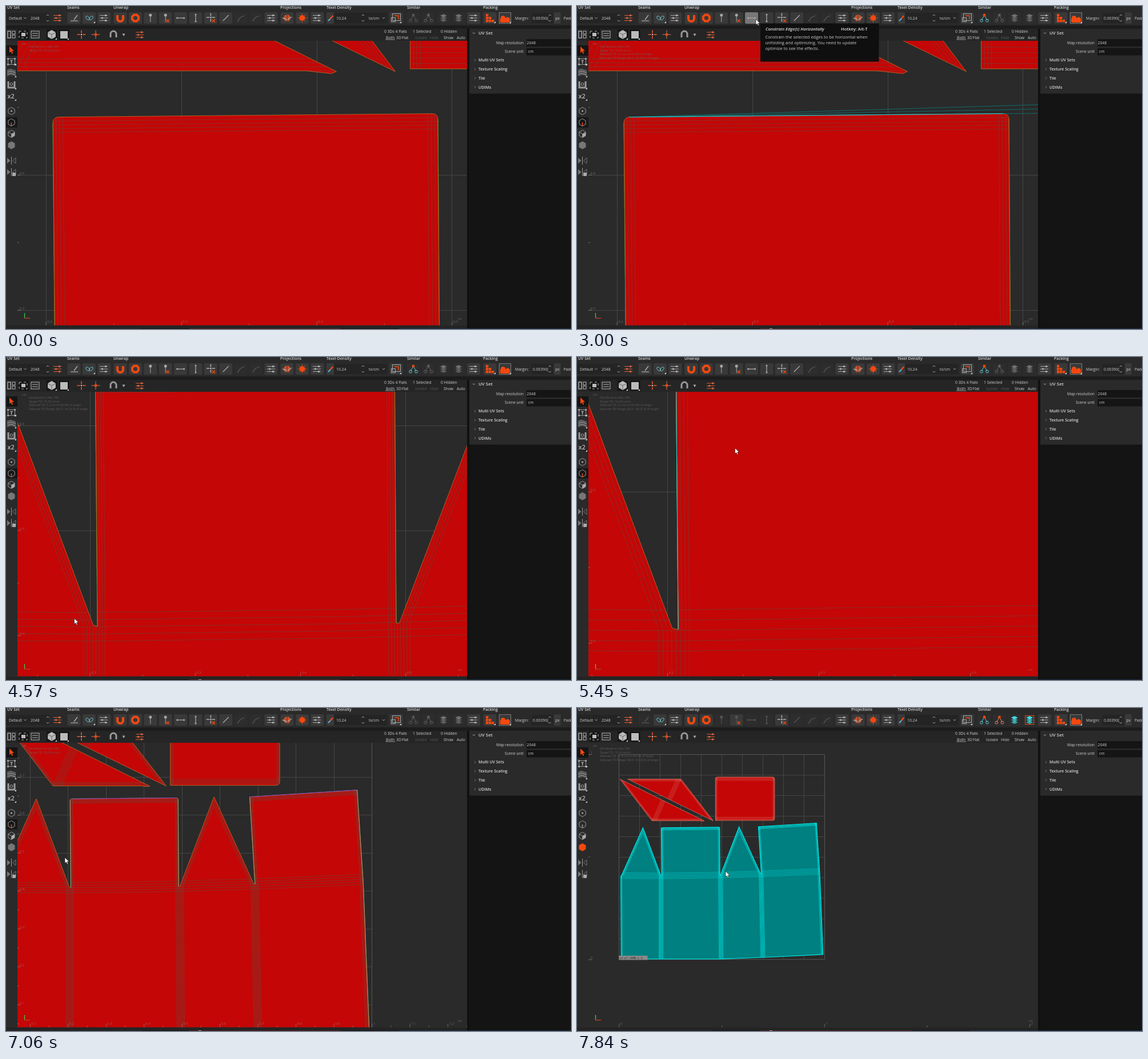
An HTML page with a canvas for the animation above (8 s loop, 989 px wide and 566 px high).

```html
<!DOCTYPE html>
<html lang="en">
<head>
<meta charset="utf-8">
<title>UV editor</title>
<style>
html, body { margin: 0; width: 100%; height: 100%; overflow: hidden; background: #141414; }
canvas { display: block; }
</style>
</head>
<body>
<canvas id="stage" width="989" height="566"></canvas>
<script>
const ctx = document.getElementById('stage').getContext('2d');
const LOOP = 8000;
const ORANGE = '#f4480f', GREY = '#a8a8a8', DIM = '#565656', CYAN = '#22d8e0', RED = '#c40606';
const FONT = '"Open Sans", "Noto Sans", sans-serif';
const VIEW = { x: 20, y: 61, r: 807, b: 559.5 };

// wheel zooms about a fixed screen point
const ZOOMS = [
  { from: 4130, to: 4550, by: .7774, x: 416, y: -495 },
  { from: 4590, to: 4870, by: 1.439, x: 121, y: 458 },
  { from: 6860, to: 7060, by: .2511, x: 92, y: 260 },
  { from: 7060, to: 7640, by: .5402, x: 189, y: 269.5 }
];
const MOVES = [
  { from: 20, to: 820, x: 755.5, y: 193, bow: 270 },
  { from: 1080, to: 1680, x: 200, y: 191 },
  { from: 1960, to: 2480, x: 313, y: 23 },
  { from: 3260, to: 3880, x: 119.5, y: 458 },
  { from: 5070, to: 5270, x: 176, y: 420 },
  { from: 5270, to: 5570, x: 330, y: 21 },
  { from: 6640, to: 6660, x: 315.5, y: 41 },
  { from: 6660, to: 6860, x: 100, y: 262 },
  { from: 6860, to: 7060, x: 103, y: 262 },
  { from: 7060, to: 7640, x: 260, y: 286 }
];

const clamp = k => Math.max(0, Math.min(1, k));
const phase = (t, m) => clamp((t - m.from) / (m.to - m.from));
const range = (n, f) => Array.from({ length: n }, (_, i) => f(i));

let cam;
function cameraAt(t) {
  const c = { s: 2369, x: -403.6, y: 1717.5 };
  for (const z of ZOOMS) {
    const f = Math.pow(z.by, phase(t, z));
    c.s *= f;
    c.x = z.x + (c.x - z.x) * f;
    c.y = z.y + (c.y - z.y) * f;
  }
  return c;
}
function pointerAt(t) {
  let x = -14, y = 180;
  for (const m of MOVES) {
    const k = phase(t, m), e = k * k * (3 - 2 * k);
    x += (m.x - x) * e;
    y += (m.y - y) * e + (m.bow || 0) * Math.sin(Math.PI * e);
  }
  return [x, y];
}
const sx = u => cam.x + u * cam.s / 1000;
const sy = v => cam.y - v * cam.s / 1000;
const uv = pts => pts.map(([u, v, r = 0]) => [sx(u), sy(v), r * cam.s / 1000]);

// islands in thousandths of UV space, an optional third value rounds the corner
const FLAPS = [
  [[207, 409], [205, 642.8, 4], [489.5, 645.4, 4], [491, 412]],
  [[692, 418], [678, 648], [961, 666], [977, 420]]
];
const SPIKES = [
  [[12, 411], [116, 643], [203, 410]],
  [[494, 412], [584, 648], [689, 418]]
];
const BODY = [...SPIKES[0], ...FLAPS[0], ...SPIKES[1], ...FLAPS[1], [993, 25], [707, 11], [490, 3], [10, 3], [8, 408]];
const TRI_A = [[4, 880], [160, 677], [392, 677], [411, 675], [414.5, 676.6]];
const TRI_B = [[42, 880], [301, 880], [441, 699], [458, 676.5]];
const BOX = [[469, 678.5, 9], [757, 678.5, 9], [757, 890, 9], [469, 890, 9]];
const FOLD = [[8, 409], [200, 408], [445, 411], [690, 418], [977, 430]];
const BANDS = [{ u: 204, v: 409, drift: 0 }, { u: 493.5, v: 412, drift: 3 }, { u: 691, v: 418, drift: 9 }];

const shift = (pts, du, dv) => pts.map(([u, v]) => [u + du, v + dv]);
const fan = (pts, n, du, dv) => range(n, i => shift(pts, du * i, dv * i));

function bodyCreases() {
  const out = fan(shift(FOLD, 0, 14), 5, 0, -6.8);
  for (const b of BANDS) out.push(...fan([[b.u - 10, b.v], [b.u - 10 + b.drift, 3]], 8, 2.9, 0));
  for (const [a, b, c, d] of FLAPS)
    out.push(...fan(shift([b, c], 0, -3), 4, 0, -2.8), ...fan(shift([a, b], 2.4, 0), 3, 2.5, 0), ...fan(shift([c, d], -2.4, 0), 3, -2.5, 0));
  for (const [a, b, c] of SPIKES)
    for (let k = 1; k < 4; k++) out.push([[a[0] + 3 * k, a[1]], [b[0], b[1] - 8 * k], [c[0] - 3 * k, c[1]]]);
  out.push(...fan([[11, 408], [13, 3]], 2, 3, 0), ...fan([[974, 420], [990, 25]], 3, -3, 0));
  return out;
}
const ISLANDS = [
  { shape: TRI_A, creases: [...fan([[160, 677], [205, 780]], 6, 4.5, 0), ...fan([[4, 880], [160, 677]], 4, 3, 0), ...fan([[160, 677], [414, 677]], 4, 0, 3)] },
  { shape: TRI_B, creases: [...fan([[301, 880], [254, 776]], 6, -4.5, 0), ...fan([[301, 880], [458, 677]], 4, -3, 0), ...fan([[42, 880], [301, 880]], 4, 0, -3)] },
  { shape: BOX, creases: [...fan([BOX[0], BOX[1]], 5, 0, 4), ...fan([BOX[3], BOX[2]], 5, 0, -4), ...fan([BOX[0], BOX[3]], 4, 2.5, 0), ...fan([BOX[1], BOX[2]], 4, -2.5, 0)] },
  { shape: BODY, creases: bodyCreases(), main: true }
];

function rect(x, y, w, h, c) { ctx.fillStyle = c; ctx.fillRect(x, y, w, h); }
function frame(x, y, w, h, c, lw = 1) { ctx.strokeStyle = c; ctx.lineWidth = lw; ctx.strokeRect(x, y, w, h); }
function text(s, x, y, size = 6.8, c = '#cfcfcf', style = '') {
  ctx.font = `${style} ${size}px ${FONT}`;
  ctx.fillStyle = c;
  ctx.fillText(s, x, y);
}
function path(pts, closed) {
  ctx.beginPath();
  pts.forEach(([x, y, r], i) => {
    const next = pts[(i + 1) % pts.length];
    if (r && closed) ctx.arcTo(x, y, next[0], next[1], r);
    else if (i) ctx.lineTo(x, y);
    else ctx.moveTo(x, y);
  });
  if (closed) ctx.closePath();
}
function line(pts, c, w = 1, closed) {
  path(pts, closed);
  ctx.strokeStyle = c; ctx.lineWidth = w; ctx.stroke();
}
const seg = (x0, y0, x1, y1, c, w) => line([[x0, y0], [x1, y1]], c, w);
function poly(pts, c) { path(pts, true); ctx.fillStyle = c; ctx.fill(); }
function round(x, y, w, h, r, c) { ctx.beginPath(); ctx.roundRect(x, y, w, h, r); ctx.fillStyle = c; ctx.fill(); }
function dot(x, y, r, c) { ctx.beginPath(); ctx.arc(x, y, r, 0, 7); ctx.fillStyle = c; ctx.fill(); }
function ring(x, y, r, c) { ctx.beginPath(); ctx.arc(x, y, r, 0, 7); ctx.strokeStyle = c; ctx.lineWidth = 1; ctx.stroke(); }
const ngon = (x, y, r, n = 6, turn = 0) => range(n, i => {
  const a = i * 2 * Math.PI / n + turn;
  return [x + r * Math.sin(a), y - r * Math.cos(a)];
});
const chevron = (x, y, d = 1) => line([[x - 2.2, y - d], [x, y + d], [x + 2.2, y - d]], GREY);
const corner = (x, y) => poly([[x, y], [x, y - 3], [x - 3, y]], '#ddd');

function sliders(x, y, c) {
  for (let i = -1; i < 2; i++) {
    seg(x - 7, y + 4.5 * i, x + 7, y + 4.5 * i, c);
    rect(x + (i ? 2 : -4), y + 4.5 * i - 1.5, 3, 3, c);
  }
}
function cross(x, y) {
  for (const d of [2.5, -2.5]) seg(x - 2.5, y - d, x + 2.5, y + d, ORANGE, 1.5);
}
function tree(x, c, leaf) {
  line([[x - 5, 25], [x, 16], [x + 5, 25]], leaf);
  dot(x, 16, 2.4, c); ring(x - 5, 25.5, 2.4, leaf); ring(x + 5, 25.5, 2.4, leaf);
}
function layers(x, c) {
  for (const y of [25, 21, 17]) poly([[x - 6, y], [x, y - 3], [x + 6, y], [x, y + 3]], y < 20 ? c : c + 'b0');
}
function arrows4(x, y, c) {
  for (const [x1, y1] of ngon(x, y, 7.5, 4)) seg(x + (x1 - x) * .3, y + (y1 - y) * .3, x1, y1, c, 1.6);
  rect(x - 1, y - 1, 2, 2, '#ddd');
}
function magnet(x, y, r, c, w) {
  ctx.beginPath();
  ctx.arc(x, y, r, Math.PI, 0); ctx.lineTo(x + r, y + 6); ctx.moveTo(x - r, y); ctx.lineTo(x - r, y + 6);
  ctx.strokeStyle = c; ctx.lineWidth = w; ctx.stroke();
}

// toolbar groups: first button centre and button count
const PITCH = 26.4;
const GROUPS = { seams: [119, 3], unwrap: [200, 11], project: [492, 3], density: [683, 1], similar: [713, 5], pack: [847, 2] };
const slot = (group, i) => GROUPS[group][0] + i * PITCH;

function buttons(on) {
  for (const g in GROUPS) for (let i = 0; i < GROUPS[g][1]; i++) {
    const off = g === 'similar' && i < 4 || g === 'unwrap' && (i > 7 && i < 10 || on.island && [2, 4, 5, 7].includes(i)) || on.island && g === 'seams' && !i;
    const hot = g === 'unwrap' && i === on.hover;
    round(slot(g, i) - 11.5, 11, 23, 20, 2, hot ? '#777' : off ? '#2d2d2d' : '#393939');
  }
  round(561, 11, 13, 20, 2, '#393939');
  round(959, 11, 12, 20, 2, '#393939');
}

function unwrapIcons(on) {
  const y = 21, c = on.island ? DIM : GREY, at = i => slot('unwrap', i);
  ctx.save(); ctx.translate(0, 2 * y); ctx.scale(1, -1); magnet(at(0), 20, 5, ORANGE, 4); ctx.restore();
  line(ngon(at(1), y, 6, 8, Math.PI / 8), ORANGE, 4, true);
  for (const i of [2, 3]) { dot(at(i), 16, 2.5, c); seg(at(i), 18, at(i), 28, c); }
  cross(at(3) + 4, 26);
  seg(at(4) - 7, y, at(4) + 7, y, c, 1.3);
  seg(at(5), 14, at(5), 28, c, 1.3);
  for (const d of [-6, 6]) { dot(at(4) + d, y, 1.5, c); dot(at(5), y + d, 1.5, c); }
  arrows4(at(6), 20, GREY); cross(at(6) + 5, 26);
  seg(at(7) - 5, 26, at(7) + 5, 16, c, 1.3);
  for (const i of [8, 9]) line([[at(i) - 6, 27], [at(i) - 1, 20], [at(i) + 6, 17]], DIM, 1.3);
  sliders(at(10), y, GREY);
}

function toolbar(on) {
  const y = 21;
  rect(0, 0, 989, 34, '#2a2a2a');
  rect(0, 34, 989, 6, '#1c1c1c');
  Object.entries({ 'UV Set': 2, Seams: 107, Unwrap: 188, Projections: 480, 'Texel Density': 561, Similar: 702, Packing: 835 })
    .forEach(([s, x]) => text(s, x, 5, 6.9, '#d6d6d6', '600'));
  rect(0, 12, 76, 18, '#242424'); rect(575, 12, 92, 18, '#242424'); rect(920, 12, 38, 18, '#242424');
  Object.entries({ Default: 5, '2048 ': 43, '10.24': 578, 'tx/cm': 635, 'Margin:': 891, '0.00390(': 922 })
    .forEach(([s, x]) => text(s, x, 23.5));
  for (const x of [33.5, 661]) chevron(x, y);
  for (const x of [73, 625, 952]) { chevron(x, 16, -1); chevron(x, 26); }
  sliders(90, y, '#d9603a');
  buttons(on);
  text('px', 961.5, 23.5); text('Padding', 976, 23.5);

  const edge = on.island ? DIM : GREY;
  seg(113, 26, 126, 26, edge, 1.3); seg(119, 24, 125, 16, edge, 1.6);
  for (const d of [-3, 3]) { ctx.beginPath(); ctx.ellipse(146 + d, y, 4, 2.5, d < 0 ? .8 : 2.3, 0, 7); ctx.strokeStyle = '#6cc4cf'; ctx.lineWidth = 1; ctx.stroke(); }
  for (const x of [171, 544, 818]) sliders(x, y, GREY);
  unwrapIcons(on);

  dot(492, y, 6, '#c9512a'); line([[484, 21], [492, 24], [500, 19]], GREY, 1.4); seg(492, 13, 492, 29, '#393939');
  for (const [a, b] of ngon(518.5, y, 8, 8)) seg(518.5, y, a, b, '#c9512a');
  dot(518.5, y, 5, ORANGE);
  seg(564, 26, 568, 22, '#57b9e8', 2); seg(568, 22, 572, 17, ORANGE, 2.5);
  frame(676.5, 13.5, 14, 12, GREY); frame(674.5, 20.5, 7, 7, GREY);
  line([[680, 17], [687, 17], [687, 23]], ORANGE, 1.5);

  const at = i => slot('similar', i);
  tree(at(0), on.similar ? ORANGE : DIM, on.similar ? '#5dc3cc' : DIM);
  tree(at(1), on.picked ? ORANGE : '#606060', on.picked ? '#ee8060' : '#606060');
  for (const i of [2, 3]) layers(at(i), on.picked ? '#45d8e4' : '#707070');
  if (on.picked) frame(at(3) - 7.5, 13.5, 15, 15, ORANGE);
  for (let r = 0; r < 3; r++) for (let i = 0; i < [1, 2, 3][r]; i++) rect(840 + 5 * i, 14 + 5 * r, 4.3, 4.3, ORANGE);
  frame(863.5, 11.5, 20, 19, '#777');
  round(865, 21, 17, 8, 2, ORANGE); dot(870, 21, 4, ORANGE); dot(878, 23, 3.5, ORANGE);
  for (const x of [156, 692, 857, 884]) corner(x, 30);
}

function viewBar(on) {
  rect(0, 40, 807, 21, '#252525');
  for (const x of [30, 80, 101]) rect(x - 9, 41, 19, 18, '#161616');
  const c = '#bbb';
  frame(3, 44, 5, 12, c, 1.3); frame(11, 44, 5, 5, c); frame(11, 51, 5, 5, c);
  ctx.setLineDash([4, 4]); frame(23, 44, 14, 12, c); ctx.setLineDash([]); rect(27, 47, 7, 6, c);
  frame(44, 44, 14, 12, c); seg(46, 48, 56, 48, c); seg(46, 52, 56, 52, c);
  poly(ngon(80, 50, 8), c); line([[73, 46.5], [80, 50], [87, 46.5]], '#666'); seg(80, 50, 80, 58, '#666');
  rect(95, 44, 13, 13, c); corner(89, 59); corner(110, 59);
  arrows4(132, 50, '#e2572c'); arrows4(157, 50, '#8a5c4a'); dot(157, 50, 2.5, ORANGE);
  magnet(188, 49, 5, '#999', 3); poly([[203.5, 48.5], [208.5, 48.5], [206, 53]], '#aaa');
  sliders(234, 50.5, '#d9603a');
  const put = (y, labels, color) => Object.entries(labels).forEach(([s, x]) => text(s, x, y, 6.8, color));
  put(47, { '0 3Ds 4 Flats': 662, '1 Selected': 712, '0 Hidden': 761 });
  put(57.5, { Both: 665, '3D': 683, Flat: 693, Show: 766, Auto: 789 });
  put(57.5, { Isolate: 716, Hide: 742 }, on.picked ? '#c8c8c8' : '#565656');
  seg(664, 59, 681, 59, '#aaa', .8);
}

function sideBar(on) {
  rect(0, 61, 20, 505, '#2a2a2a');
  rect(0, 69, 20, 18, '#151515');
  if (!on.island) rect(0, 195, 20, 18, '#171717');
  poly(arrowhead(6, 71, 1.1), ORANGE);
  frame(3.5, 92.5, 12, 10, '#999');
  for (const x of [2, 14]) for (const y of [91, 101]) rect(x, y, 3, 3, '#999');
  text('T', 7.3, 100.5, 8, '#bbb', '700');
  poly([[2, 112], [8, 110], [17, 113], [17, 123], [9, 121], [2, 123]], '#777');
  for (const d of [0, 4, 8]) line([[2, 114 + d], [9, 112 + d], [17, 115 + d]], '#333');
  line([[4, 132], [4, 143], [15, 143], [15, 132]], '#999', 3); ring(9.5, 137, 2.3, '#aaa');
  text('x2', 2.5, 162, 11, '#bbb', '600');
  for (const y of [104, 125, 146, 166]) corner(18, y);
  for (const y of [184, 204, 224]) line(ngon(9.5, y, 6.5), '#999', 1, true);
  dot(9.5, 184, 1.5, '#aaa');
  seg(9.5, 204, 9.5, 210, on.island ? '#999' : ORANGE, 1.5);
  poly([[9.5, 224], [15, 221], [15, 227.5], [9.5, 230.5]], '#aaa'); line([[4, 221], [9.5, 224], [9.5, 230]], '#999');
  poly(ngon(9.5, 244, 7), on.island ? ORANGE : '#777');
  for (const y of [271, 291]) {
    poly([[2, y - 5], [7.5, y], [2, y + 5]], '#777'); seg(9.5, y - 7, 9.5, y + 7, '#999');
    line([[17, y - 5], [11.5, y], [17, y + 5]], '#777', 1, true);
  }
  rect(11, 292, 6, 6, '#aaa');
}

function panel() {
  rect(807, 40, 4, 526, '#111');
  rect(811, 40, 178, 526, '#141414');
  rect(811, 40, 178, 113.5, '#2a2a2a');
  chevron(819, 47.5); text('UV Set', 827, 50, 7.9, '#d6d6d6', '600');
  text('Map resolution', 858, 67); text('Scene unit', 873, 82.3);
  rect(911, 58, 78, 13, '#151515'); rect(911, 73.5, 78, 13, '#151515');
  text('2048', 911.5, 67); text('cm', 914, 82.3);
  ['Multi UV Sets', 'Texture Scaling', 'Tile', 'UDIMs'].forEach((s, i) => {
    const y = 95 + i * 15.7;
    line([[820, y - 2], [822, y], [820, y + 2]], '#777');
    text(s, 827, y + 2.4, 7, '#d6d6d6', '600');
  });
}

function grid() {
  for (let i = 0; i <= 10; i++) {
    const c = i % 10 ? '#454545' : '#555';
    const x = Math.floor(sx(i * 100)) + .5, y = Math.floor(sy(i * 100)) + .5;
    seg(x, sy(1000), x, sy(0), c);
    seg(sx(0), y, sx(1000), y, c);
  }
}
function ruler() {
  const step = cam.s > 600 ? 100 : 1000, c = 'rgba(150,150,150,.6)';
  for (let i = 0; i < 40; i++) {
    const n = i * step / 2, x = sx(n), y = sy(n), major = i % 2 === 0, len = major ? 6 : 3;
    seg(x, VIEW.b - len, x, VIEW.b, c);
    if (major) text(String(n / 1000), x + 2, 555, 6, c);
    if (n > 1000) continue;
    seg(VIEW.x, y, VIEW.x + len, y, c);
    if (major) text(String(n / 1000), 24, y - 1.2, 6, c);
  }
  text('cm', 28, 67.5, 5, c); text('cm', 790.5, 550, 5, c);
  seg(32.5, 547, 32.5, 538, '#35d04a', 1.3); seg(32, 547, 42, 547, '#b03a2a', 1.3);
}

function islands(t, on) {
  for (const isl of ISLANDS) {
    const picked = on.picked && isl.main, pts = uv(isl.shape);
    poly(pts, picked ? '#008080' : RED);
    ctx.save(); path(pts, true); ctx.clip();
    const c = picked ? 'rgba(0,225,225,.7)' : on.island ? 'rgba(215,130,120,.45)' : 'rgba(80,88,70,.55)';
    for (const l of isl.creases) line(uv(l), c, on.island ? .7 : .9);
    ctx.restore();
    line(pts, picked ? '#00e4e4' : on.island ? '#c86a5c' : '#b3692a', picked ? 1.2 : .9, true);
  }
  if (!on.island) edges(t);
}
function edges(t) {
  const mark = (pts, c, w) => line(uv(pts), c, w);
  const [a, b, c, d] = FLAPS[0], [e, f, g, h] = FLAPS[1];
  const top = [[b[0] + 4, b[1]], [c[0] - 4, c[1]]], left = [a, [b[0], b[1] - 4]], right = [d, [c[0], c[1] - 4]];
  const sides = t > 6420 ? '#93a983' : '#7d862a';
  for (const s of [left, right, [e, f], [g, h, [993, 25]]]) mark(s, sides, .9);
  if (t > 3120) for (const s of [top, [f, g]]) mark(s, '#7a5ad0');
  if (t >= 900 && t < 1820) mark([c, [511.5, 644.6]], '#147a74');
  if (t >= 1820 && t < 5270) {
    for (let k = 0; k < 3; k++) mark([top[0], [511.5, 645.6 + 3.2 * k]], '#0d7373', .9);
    mark(top, CYAN);
  }
  if (t >= 5270 && t < 6420) mark(left, CYAN);
}

function info(on) {
  const rows = ['Distribute to tiles: ON', 'Target TD: 10.24 tx/cm'];
  if (on.picked) rows.push('Selected TD: 6.16 tx/cm 60.1% of target', 'Selected TD Range: [58.4 : 61.0] % of target');
  else if (on.edge) rows.push('Selected TD: 6.2 tx/cm 60.5% of target', 'Selected TD Range: [60.5 : 60.5] % of target');
  rows.forEach((s, i) => text(s, 40, 73 + i * 6.6, 5.2, 'rgba(105,105,105,.8)'));
  if (!on.picked) return;
  rect(73.5, 434, 50, 7.5, '#8a8a8a');
  text('u1 v1 : 69%  L  C', 75, 439.7, 5.4, '#1a1a1a');
}

function tooltip(x, y, word, key) {
  rect(x, y, 207.5, 67, '#0f0f0f');
  text(`Constrain Edge(s) ${word[0].toUpperCase() + word.slice(1)}ly`, x + 9, y + 12, 7.5, '#ddd', 'italic 600');
  text(`Hotkey: ${key}`, x + 141, y + 12, 7.6, '#ddd', '600');
  [`Constrain the selected edges to be ${word} when`, 'unfolding and optimizing. You need to update', 'optimize to see the effects.']
    .forEach((s, i) => text(s, x + 8.5, y + 26 + i * 10, 7.5));
}

function arrowhead(x, y, k) {
  return [[0, 0], [0, 10], [2.4, 7.9], [4, 11.5], [5.6, 10.8], [4.1, 7.3], [7.3, 7]].map(([a, b]) => [x + a * k, y + b * k]);
}
function pointer(x, y) {
  const p = arrowhead(x, y, 1);
  poly(p, '#fff'); line(p, '#111', .6, true);
}

function draw(t) {
  const within = (a, b) => t >= a && t < b;
  cam = cameraAt(t);
  const on = {
    edge: within(1070, 6420), similar: within(1100, 6420) || t >= 7740,
    island: t >= 7500, picked: t >= 7740,
    hover: within(5500, 6670) ? 5 : within(2400, 3300) ? 4 : -1
  };
  rect(0, 0, 989, 566, '#1c1c1c');
  rect(20, 61, 787, 499, '#2a2a2a');
  ctx.save();
  ctx.beginPath(); ctx.rect(20, 61, 787, 498.5); ctx.clip();
  grid(); islands(t, on); ruler(); info(on);
  ctx.restore();
  toolbar(on); viewBar(on); sideBar(on); panel();
  rect(0, 560, 807, 6, '#242424');
  rect(237, 565, 450, 1, '#111'); rect(320, 565, 266, 1, '#5a1c1c'); rect(690, 565, 299, 1, '#1c2f4a');
  if (t >= 1070) rect(337, 565, 5, 1, '#aaa');
  if (within(3000, 3260)) tooltip(321, 30.5, 'horizontal', 'Alt-T');
  if (within(6110, 6670)) tooltip(338, 29, 'vertical', 'Alt-V');
  if (t >= 20) pointer(...pointerAt(t));
}

const start = performance.now();
function tick() {
  draw((performance.now() - start) % LOOP);
  requestAnimationFrame(tick);
}
tick();
</script>
</body>
</html>
```
